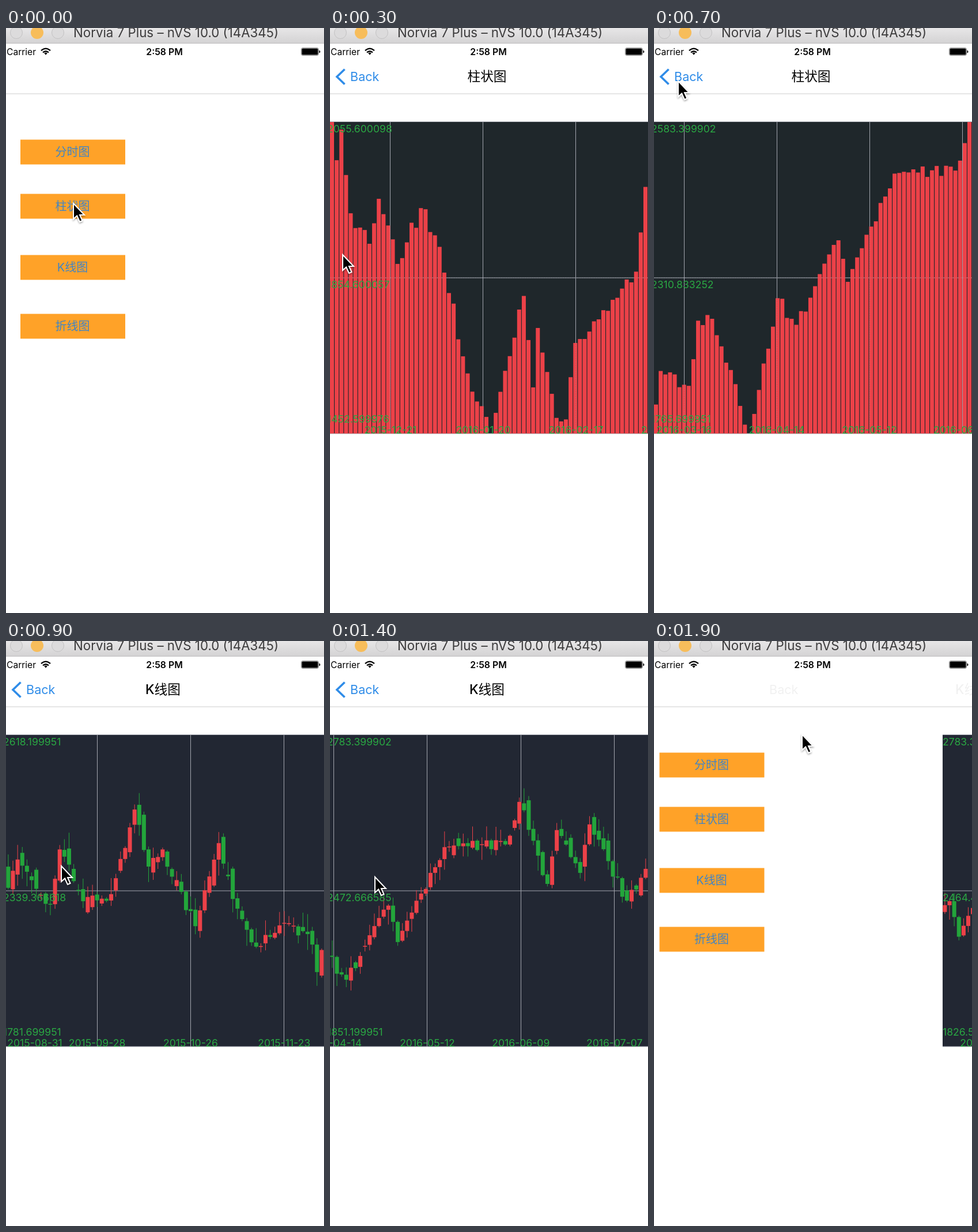
These frames come from a looping animation (552x1014 px, 2 s). An HTML page:

```html
<!DOCTYPE html>
<html lang="zh">
<head>
<meta charset="utf-8">
<title>Stock charts</title>
<style>
html, body { margin: 0; width: 100%; height: 100%; overflow: hidden; background: #fff; }
svg { display: block; width: 552px; height: 1014px; font-family: Inter, "Noto Sans CJK SC", "Noto Sans CJK", sans-serif; }
.label { font-size: 17.6px; fill: #2aa843; }
.title { font-size: 22.7px; font-weight: 500; text-anchor: middle; }
.back { font-size: 21.6px; fill: #2f8ce8; }
.ghost text { fill: #f1f1f1; }
.button { font-size: 20px; fill: #4184c4; text-anchor: middle; }
.mid { text-anchor: middle; }
</style>
</head>
<body>
<svg viewBox="0 0 552 1014">
  <defs>
    <linearGradient id="bar" x2="0" y2="1">
      <stop stop-color="#e7e6e7"/><stop offset="1" stop-color="#d3d2d3"/>
    </linearGradient>
    <filter id="shadow" x="-50%" y="-50%" width="200%" height="200%">
      <feDropShadow dx="0" dy="2" stdDeviation="1.5" flood-opacity=".35"/>
    </filter>
    <clipPath id="plot"><rect y="162" width="552" height="542"/></clipPath>
  </defs>

  <rect width="552" height="27" fill="url(#bar)"/>
  <path d="M0 26.5H552" stroke="#bdbcbd"/>
  <g fill="#dcdbdc" stroke="#c3c2c3">
    <circle cx="18" cy="8" r="10.5"/>
    <circle cx="54" cy="8" r="11" fill="#f7bd5b" stroke="none"/>
    <circle cx="90" cy="8" r="10.5"/>
  </g>
  <text x="117" y="16" font-size="22.3" fill="#3c3b3c">Norvia 7 Plus – nVS 10.0 (14A345)</text>

  <text x="1" y="47" font-size="15.6">Carrier</text>
  <g fill="none" stroke="#000" stroke-width="2.3">
    <path d="M61 39.2Q69 32 77 39.2M64 42.4Q69 38 74 42.4"/>
    <path d="M66.2 43.6Q69 41.6 71.8 43.6L69 46.8Z" fill="#000" stroke="none"/>
  </g>
  <text class="mid" x="275" y="47" font-size="15.8" font-weight="600">2:58 PM</text>
  <rect x="512.5" y="34.5" width="30" height="13" rx="2.5" fill="none" stroke="#888"/>
  <rect x="513.5" y="35.5" width="28" height="11" rx="1.5"/>
  <path d="M543.5 38.5q2 .5 2 2.5t-2 2.5z"/>
  <path d="M0 114H552" stroke="#dedede" stroke-width="1.5"/>

  <g id="screen"></g>
  <path id="cursor" d="M0 0V27L6.2 21.5L11 32L15.5 30L11 20H19Z" stroke="#fff" stroke-width="2" filter="url(#shadow)"/>
</svg>

<script>
const TOP = 163, BOTTOM = 703, PITCH = 8.12, COUNT = 68;
const RED = '#ec4148', GREEN = '#23a53b';
const screen = document.getElementById('screen');
const cursor = document.getElementById('cursor');

const rand = n => { const v = Math.sin(n * 127.1) * 43758.5453; return v - Math.floor(v); };

// Straight-line path through [x, value] points, held at both ends.
function along(points, x) {
  const next = points.findIndex(p => p[0] >= x);
  if (next < 0) return points[points.length - 1][1];
  const [x1, v1] = points[next];
  if (!next || x1 === x) return v1;
  const [x0, v0] = points[next - 1];
  return v0 + (v1 - v0) * (x - x0) / (x1 - x0);
}

// Turning points of the share price by trading day; small daily noise lies between them.
const turns = [
  [0, 2330], [2, 2208], [4, 2284], [11, 2164], [13, 2311], [18, 2172], [24, 2191],
  [29, 2418.199951], [32, 2265], [35, 2311], [42, 2105], [47, 2328], [50, 2178],
  [55, 2050], [62, 2113], [67, 2055.600098], [68, 1981.699951], [69, 2041], [71, 1879],
  [75, 1820], [77, 1907], [81, 1781], [86, 1889], [90, 1814], [96, 1569],
  [101, 1452.599976], [108, 1719], [110, 1542], [111, 1657], [115, 1483], [117, 1480],
  [119, 1628], [132, 1766], [134, 1930], [140, 1891], [142, 2062], [145, 2067],
  [153, 1765.699951], [159, 2121], [163, 2051.199951], [172, 2273], [174, 2164],
  [184, 2448], [197, 2456], [200, 2583.399902], [206, 2338], [208, 2499], [213, 2371],
  [215, 2516], [223, 2288], [227, 2383], [234, 2026.5], [240, 2200]
];
const turnDays = new Set(turns.map(p => p[0]));
const close = Array.from({ length: 241 }, (_, day) =>
  along(turns, day) + (turnDays.has(day) ? 0 : 34 * (rand(day) - .5)));
const open = close.map((_, day) => close[Math.max(0, day - 1)] + 30 * (2 * rand(day + 900) - 1) ** 3);

const dates = ['2015-08-31', '2015-09-28', '2015-10-26', '2015-11-23', '2015-12-21',
  '2016-01-20', '2016-02-17', '2016-03-16', '2016-04-14', '2016-05-12', '2016-06-09',
  '2016-07-07', '2016-08-04'];

const rect = (x, y, w, h, fill) => `<rect x="${x}" y="${y}" width="${w}" height="${h}" fill="${fill}"/>`;
const text = (cls, x, y, s) => `<text class="${cls}" x="${x}" y="${y}">${s}</text>`;

function menu(dx = 0) {
  const rows = { 193: '分时图', 287: '柱状图', 393: 'K线图', 495: '折线图' };
  return Object.entries(rows).map(([y, name]) =>
    rect(25 + dx, +y + .5, 182, 43, '#ffa228') + text('button', 115.5 + dx, +y + 29, name)).join('');
}

function nav(title) {
  return '<path d="M25.5 71.5L12 84.5L25.5 97.5" fill="none" stroke="#2f8ce8" stroke-width="3.6"/>' +
    text('back', 35, 92, 'Back') + text('title', 272.5, 92, title);
}

function bars(first, toY) {
  let s = '';
  for (let k = 0; k < COUNT; k++) {
    const y = toY(close[first + k]);
    s += rect(k * PITCH, y, 7, BOTTOM - y, RED);
  }
  return s;
}

function candles(first, toY) {
  let s = '';
  for (let k = 0; k < COUNT; k++) {
    const i = first + k, x = k * PITCH + .4;
    const color = close[i] > open[i] ? RED : GREEN;
    const hi = Math.max(open[i], close[i]), lo = Math.min(open[i], close[i]);
    const tip = toY(hi + 4 + 44 * rand(i) ** 2), foot = toY(lo - 4 - 44 * rand(i + 500) ** 2);
    s += rect(x + 3, tip, 1, foot - tip, color) +
      rect(x, toY(hi), 7, Math.max(1.5, toY(lo) - toY(hi)), color);
  }
  return s;
}

function chart(isBar, pos, dx = 0) {
  const first = Math.round(isBar ? pos - .2 : pos + 1);
  const shown = close.slice(isBar ? first : first - 1, first + COUNT), pad = isBar ? 0 : 200;
  const hi = Math.max(...shown) + pad, lo = Math.min(...shown) - pad;
  const toY = p => TOP + (hi - p) / (hi - lo) * (BOTTOM - TOP);
  const step = isBar ? 8.05 : PITCH;
  let grid = 'M0 162.5H552M0 433H552M0 703H552', labels = '';
  dates.forEach((date, k) => {
    const x = (20 * k - pos) * step;
    if (x < -60 || x > 620) return;
    grid += `M${Math.floor(x) + .5} ${TOP}V${BOTTOM}`;
    labels += text('label mid', k ? x : Math.max(x, 50), 702.5, date);
  });
  [[hi, 180.5], [hi - (hi - lo) / 3, 451], [lo, 684]].forEach(([v, y]) => {
    labels += text('label', dx ? 0 : -5, y, v.toFixed(6));
  });
  const lines = extra => `<path d="${grid}" fill="none" stroke="#a3a6af" ${extra}/>`;
  return `<g transform="translate(${dx})" clip-path="url(#plot)">` +
    rect(0, TOP - 1, 552, BOTTOM - TOP + 1, isBar ? '#1f272b' : '#222733') + lines('') +
    (isBar ? bars : candles)(first, toY) +
    (isBar ? lines('stroke-dasharray="1 2" opacity=".7"') : '') + labels + '</g>';
}

// Times below count in ticks of 100 ms.
const scroll = [[1, 0], [3, 66.96], [5, 133.54], [8, 133.54], [9, .54], [11, 67.3], [14, 159.2], [16, 170.4]];
const pointerX = [[1, 117], [2, 300], [3, 22], [4, 300], [6, 42], [7, 42], [9, 96],
  [10, 300], [11, 99], [12, 300], [14, 78], [18, 45], [19, 257]];
const pointerY = [[0, 304], [3, 393], [5, 400], [7, 92], [9, 390], [14, 409], [17, 95], [18, 95], [19, 162]];

function view(tick) {
  const pos = along(scroll, tick);
  if (tick === 0 || tick === 8) return menu();
  if (tick < 8) return nav('柱状图') + chart(true, pos);
  if (tick < 19) return nav('K线图') + chart(false, pos);
  return menu(-15.5) + '<g class="ghost">' + text('back', 200, 92, 'Back') +
    text('title', 553.5, 92, 'K线图') + '</g>' + chart(false, pos, 501);
}

let last = -1;
function draw() {
  const tick = Math.floor(performance.now() / 100) % 20;
  if (tick !== last) {
    last = tick;
    screen.innerHTML = view(tick);
    cursor.setAttribute('transform', `translate(${along(pointerX, tick)} ${along(pointerY, tick)})`);
  }
  requestAnimationFrame(draw);
}
draw();
</script>
</body>
</html>
```
